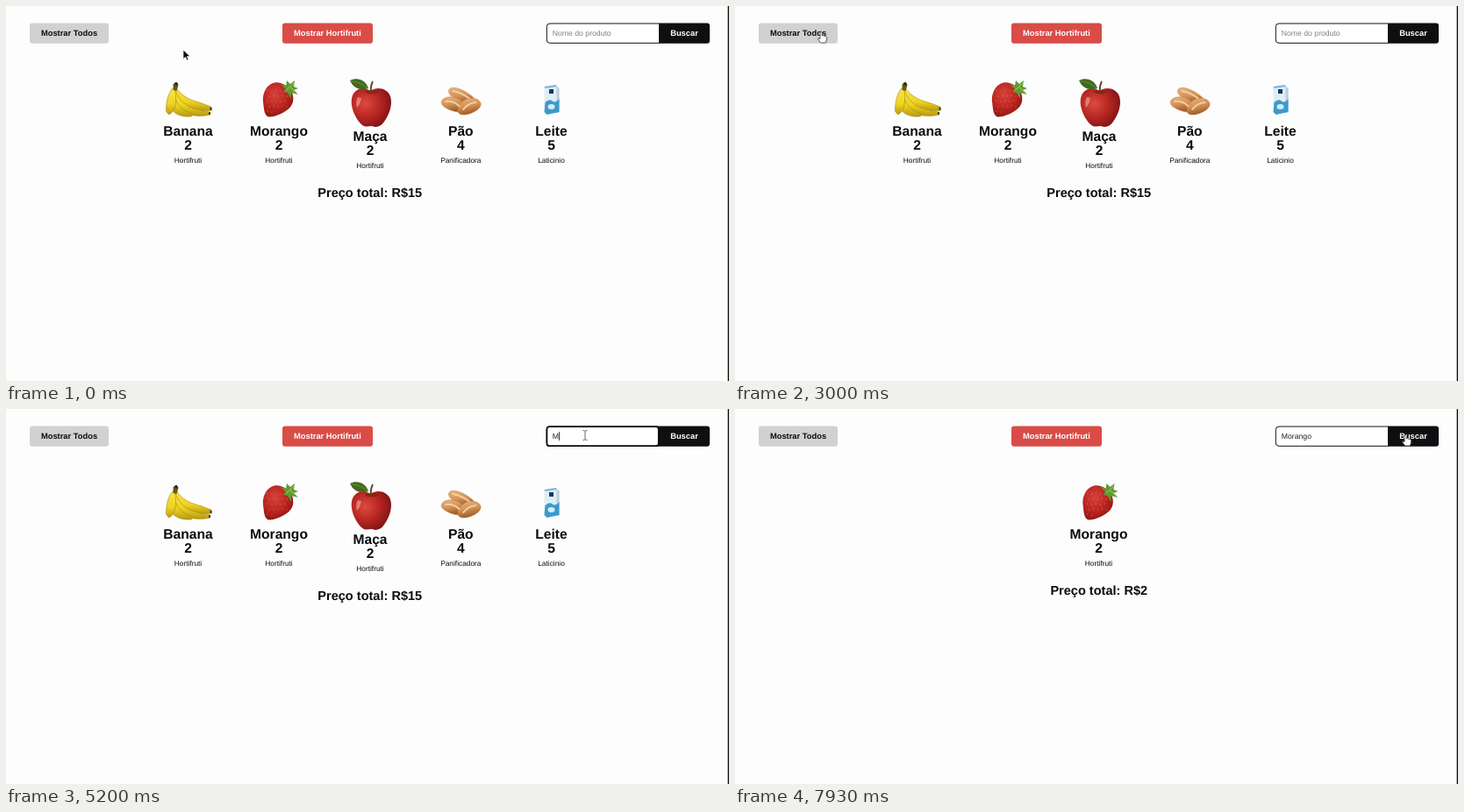
Write an HTML page that moves like this. It is 824 by 428 pixels and loops after 8 s.

```html
<!DOCTYPE html>
<html lang="pt">
<head>
<meta charset="utf-8">
<title>Lista de produtos</title>
<style>
  html, body { margin: 0; width: 100%; height: 100%; overflow: hidden; background: #fdfdfd; }
  svg { display: block; width: 100vw; height: 100vh; }
  text { font: 8.32px "Liberation Sans", Arial, sans-serif; fill: #0b0b0b; text-rendering: geometricPrecision; white-space: pre; }
  .btn { font-size: 9.36px; font-weight: bold; }
  .name { font-size: 15.6px; font-weight: bold; }
  .total { font-size: 14.56px; font-weight: bold; }
  .field { font-size: 8.67px; }
  .mid { text-anchor: middle; }
  .light { fill: #fff; }
</style>
</head>
<body>
<svg viewBox="0 0 824 428">
  <defs>
    <linearGradient id="peel" x2="0" y2="1"><stop stop-color="#f8e448"/><stop offset=".6" stop-color="#eed322"/><stop offset="1" stop-color="#b89a10"/></linearGradient>
    <radialGradient id="berry" cx=".4" cy=".35" r=".75"><stop stop-color="#d8413a"/><stop offset=".55" stop-color="#b92420"/><stop offset="1" stop-color="#831310"/></radialGradient>
    <radialGradient id="skin" cx=".35" cy=".4" r=".7"><stop stop-color="#dc4a40"/><stop offset=".5" stop-color="#b92723"/><stop offset="1" stop-color="#7c1214"/></radialGradient>
    <linearGradient id="crust" x2=".3" y2="1"><stop stop-color="#e8b482"/><stop offset=".55" stop-color="#d59254"/><stop offset="1" stop-color="#9d5b28"/></linearGradient>
  </defs>

  <rect x="822.6" width="1.4" height="428" fill="#151515"/>
  <rect x="27" y="19.5" width="90" height="23.2" rx="3" fill="#d1d1d1"/>
  <text class="btn mid" x="72" y="34.3">Mostrar Todos</text>
  <rect x="315" y="19.5" width="103" height="23.2" rx="3" fill="#d94c47"/>
  <text class="btn mid light" x="366.4" y="34.3">Mostrar Hortifruti</text>
  <path d="M744 20H620Q616.300 20 616.300 23.500V39Q616.300 42.300 620 42.300H744" fill="#fff" stroke="#111" stroke-width="1"/>
  <path d="M744 19.500H799Q802 19.500 802 22.500V39.700Q802 42.700 799 42.700H744Z" fill="#0f0f12"/>
  <text class="btn mid light" x="773" y="34.3">Buscar</text>
  <rect id="focus" x="616.4" y="20.2" width="127.400" height="22" rx="3" fill="#fff" stroke="#0b0b0b" stroke-width="1.8"/>
  <text id="field" class="field" x="622.8" y="34.2"></text>
  <rect id="caret" y="26" width=".8" height="10" fill="#111"/>

  <!-- products, drawn around x = 0 -->
  <g class="item">
    <g stroke="#a78c12" stroke-width=".6" fill="url(#peel)">
      <path d="M-13 94C-8 101 -2 105 6 108Q17 111 26 115L27 119Q14 121 2 116C-9 111 -15 103 -16 95Z"/>
      <path d="M-15 94C-11 108 -3 114 7 117Q16 120 25 121L25 124Q10 128 -4 122C-15 116 -18 105 -18 96Z"/>
      <path d="M-17 94C-15 104 -14 111 -7 117Q-2 121 5 123L4 126Q-8 127 -15 122C-22 115 -21 103 -18 95Z"/>
      <path d="M-18 94C-23 101 -25 109 -25 120L-22 124Q-17 122 -15 115C-13 107 -14 101 -15 94Z"/>
    </g>
    <path d="M-17 96L-17 89L-13 87L-11 90L-13 97Z" fill="#655a16"/>
    <path d="M-15.500 87.500l3-.5l1 3l-3 1Z" fill="#2e2910"/>
    <path d="M25 115l2 1v3l-2 0ZM23.500 121l2 0v3l-2 .3Z" fill="#4b3f12"/>
  </g>
  <g class="item">
    <path d="M-9 89C-15 92 -19 101 -18 109C-17 117 -17 123 -13 126C-9 128 2 124 9 119C16 114 18 107 15 99C11 91 0 84 -9 89Z" fill="url(#berry)"/>
    <g id="seeds" fill="#e39a62"></g>
    <path d="M2 89L8 91L9 85L13 89L18 85L17 92L22 94L17 96L22 101L14 99L14 106L10 99L5 98L8 95Z" fill="#5f9b31"/>
    <path d="M8 96L13 92L18 87M13 93L20 99" stroke="#a7c966" stroke-width="1" fill="none"/>
  </g>
  <g class="item">
    <path d="M0 97C-5 92 -16 93 -20 102C-24 112 -18 127 -10 135C-6 139 -2 137 2 137C7 139 12 138 16 132C22 124 26 112 23 103C20 94 8 91 0 97Z" fill="url(#skin)"/>
    <path d="M-7 98Q1 94 10 98Q2 103 -7 98Z" fill="#8a2518"/>
    <path d="M1 99Q0 92 3 86" stroke="#58401d" stroke-width="1.800" fill="none"/>
    <path d="M-23 85C-15 81 -5 84 -2 94C-11 97 -19 94 -23 85Z" fill="#43691f"/>
    <path d="M-22 85.500Q-10 87 -3 94" stroke="#7f9c45" stroke-width=".7" fill="none"/>
    <path d="M-14 104Q-17 109 -15 116Q-11 112 -10 105Z" fill="#f0a29a" opacity=".65"/>
  </g>
  <g class="item">
    <g fill="url(#crust)" stroke="#b97a43" stroke-width=".5">
      <path d="M-12 94C-6 91 6 97 14 104L17 112Q7 114 -3 108C-11 104 -17 98 -12 94Z"/>
      <path d="M-22 109C-20 103 -8 102 -1 107C6 112 4 119 -2 121C-9 121 -24 115 -22 109Z"/>
      <path d="M-3 121C-5 114 3 106 11 105C20 105 25 110 22 115C18 122 0 128 -3 121Z"/>
    </g>
    <path d="M-9 97Q1 99 9 105M-17 109Q-8 108 -2 114M3 118Q8 111 17 110" stroke="#f3cfa5" stroke-width="2" stroke-linecap="round" fill="none"/>
  </g>
  <g class="item">
    <path d="M-8 92L5 90L9 94V121L-5 124L-8 121Z" fill="#e1edf4"/>
    <path d="M5 90L9 94V121L6 122V94Z" fill="#b9d0df"/>
    <path d="M-8 92L5 90L6 92L-7 94Z" fill="#79b7dc"/>
    <rect x="-2.500" y="95" width="5" height="5" fill="#193761"/>
    <path d="M-7 110Q-2 105 2 109Q5 111 9 106V121L-5 124L-8 121Z" fill="#3b9acb"/>
    <ellipse cx="0" cy="115" rx="4" ry="3" fill="#d5edf7"/>
  </g>
  <text id="total" class="total mid" x="414.75"></text>

  <circle id="ring" fill="none" stroke="#c9535a" stroke-width="2"/>
  <g id="cursor">
    <path id="arrow" d="M0 0V10.500L2.500 8.300L4.300 12L6 11.200L4.300 7.600H7.800Z" fill="#0b0b0b" stroke="#fff" stroke-width=".7"/>
    <path id="hand" d="M-1 1Q0 -.7 1.200 1V5L2.500 4.600L4 5.200L5.300 5.300L6.600 6.500V9.500L5.300 13H-.5L-3.500 8.800Q-3.500 6.800 -1 8.500Z" fill="#fff" stroke="#333" stroke-width=".8"/>
    <path id="beam" d="M-2.500 -5.500Q0 -5.500 0 -4.500Q0 -5.500 2.500 -5.500M0 -4.500V4.500M-2.500 5.500Q0 5.500 0 4.500Q0 5.500 2.500 5.500" fill="none" stroke="#555" stroke-width=".9"/>
  </g>
</svg>
<script>
const LOOP = 8000;
const $ = id => document.getElementById(id);
const show = (el, on) => el.setAttribute('display', on ? 'inline' : 'none');
const NS = 'http://www.w3.org/2000/svg';

const products = [
  ['Banana', 2, 'Hortifruti', 0],
  ['Morango', 2, 'Hortifruti', 0],
  ['Maça', 2, 'Hortifruti', 5.9],
  ['Pão', 4, 'Panificadora', 0],
  ['Leite', 5, 'Laticinio', 0]
];
const items = [...document.querySelectorAll('.item')];

function addText(parent, text, y, cls) {
  const el = document.createElementNS(NS, 'text');
  el.textContent = text;
  el.setAttribute('y', y);
  el.setAttribute('class', cls);
  parent.append(el);
}
items.forEach((g, i) => {
  const [name, price, kind, drop] = products[i];
  addText(g, name, 148 + drop, 'name mid');
  addText(g, price, 163.6 + drop, 'name mid');
  addText(g, kind, 179 + drop, 'mid');
});
for (let i = 0; i < 22; i++) {
  const seed = document.createElementNS(NS, 'circle');
  seed.setAttribute('cx', -13 + (i % 5) * 5 + (i / 5 & 1) * 2);
  seed.setAttribute('cy', 96 + Math.floor(i / 5) * 6 + (i % 2));
  seed.setAttribute('r', .5);
  $('seeds').append(seed);
}

// x of each visible product, by index
const views = {
  all: { xs: [207.5, 311, 415, 518.3, 621.5], total: 15, y: 218.1 },
  fruit: { xs: [298, 414.5, 531], total: 6, y: 218.1 },
  search: { xs: [, 414.5], total: 2, y: 212.2 }
};
const clicks = [905, 2640, 4230, 7440];
const RING = 150;
const keys = [5150, 5290, 5410, 5560, 5820, 5930, 6020];

// start, end, from, to, upward arc
const moves = [
  [60, 830, 202, 50, 355, 30, 0],
  [1500, 2520, 355, 30, 98, 29, 0],
  [3300, 4170, 98, 29, 660, 30, 26],
  [6600, 7360, 660, 30, 764, 29, 0]
];

function pointer(t) {
  const [a, b, x0, y0, x1, y1, arc] = moves.findLast(m => t >= m[0]) || moves[0];
  const p = Math.min(1, Math.max(0, (t - a) / (b - a)));
  const e = p * p * (3 - 2 * p);
  return [x0 + (x1 - x0) * e, y0 + (y1 - y0) * e - arc * Math.sin(Math.PI * e)];
}

function drawPage(t) {
  const view = t < clicks[0] + 90 || (t >= clicks[1] + 90 && t < clicks[3] + 90)
    ? views.all : t < clicks[1] + 90 ? views.fruit : views.search;
  items.forEach((g, i) => {
    const x = view.xs[i];
    show(g, x !== undefined);
    if (x !== undefined) g.setAttribute('transform', `translate(${x} 0)`);
  });
  $('total').textContent = 'Preço total: R$' + view.total;
  $('total').setAttribute('y', view.y);
}

function drawField(t) {
  const count = keys.filter(k => t >= k).length;
  const field = $('field');
  field.textContent = count ? 'Morango'.slice(0, count) : 'Nome do produto';
  field.style.fill = count ? '#222' : '#808080';
  const focused = t >= clicks[2] && t < clicks[3];
  const since = t - (count ? keys[count - 1] : clicks[2]);
  show($('focus'), focused);
  show($('caret'), focused && since % 1000 < 500);
  $('caret').setAttribute('x', 623 + (count ? field.getComputedTextLength() : 0));
}

function drawPointer(t) {
  const [x, y] = pointer(t);
  const within = (a, b) => y > 19 && y < 43 && x > a && x < b;
  const beam = within(616, 744);
  const hand = within(27, 117) || within(315, 418) || within(744, 802);
  show($('beam'), beam);
  show($('hand'), hand);
  show($('arrow'), !beam && !hand);
  $('cursor').setAttribute('transform', `translate(${x} ${y})`);
  show($('cursor'), t < 5230 || t > 6620);

  const start = clicks.find(c => t >= c && t < c + RING);
  show($('ring'), start !== undefined);
  if (start === undefined) return;
  const p = (t - start) / RING;
  $('ring').setAttribute('cx', x + 1);
  $('ring').setAttribute('cy', y + 1);
  $('ring').setAttribute('r', 21 - 9.500 * p);
  $('ring').setAttribute('opacity', .85 - .4 * p);
}

function frame(now) {
  const t = now % LOOP;
  drawPage(t);
  drawField(t);
  drawPointer(t);
  requestAnimationFrame(frame);
}
frame(0);
</script>
</body>
</html>
```
